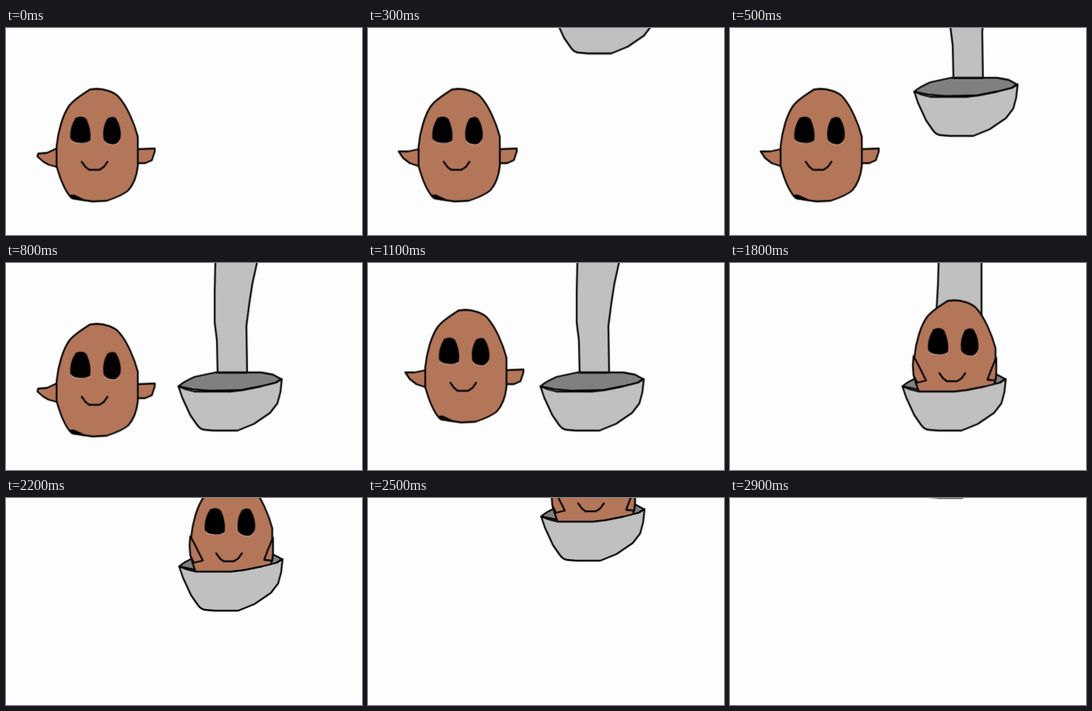
An HTML page that plays this animation: 482 by 281 pixels, repeating every 3000 ms.

```html
<!DOCTYPE html>
<html lang="en">
<head>
<meta charset="utf-8">
<title>Potato and ladle</title>
<style>
html, body { margin: 0; width: 100%; height: 100%; overflow: hidden; background: #fdfdfd; }
svg { display: block; width: 482px; height: 281px; }
.ink { stroke: #000; stroke-width: 2.3; stroke-linejoin: round; stroke-linecap: round; }
.skin { fill: #b47659; }
.steel { fill: #c0c0c0; }
.inside { fill: #808080; }
.line { fill: none; }
.glint { fill: none; stroke: #e4dcd8; stroke-width: .5; }

/* The slight negative delay keeps steps clear of the 100 ms boundaries. */
.ladle, .potato, .wave, .tuck, .narrow, .wide { animation: 3s step-end -8ms infinite; }
.ladle { animation-name: ladle; }
.potato { animation-name: potato; }
.wave { animation-name: wave; }
.tuck { animation-name: tuck; }
.narrow { animation-name: narrow; }
.wide { animation-name: wide; }
.low, .high { animation: low .2s step-end -8ms infinite; }
.high { animation-name: high; }

@keyframes ladle {
  0% { transform: translate(16px, -249px); }
  6.6667% { transform: translate(16px, -249px); animation-timing-function: steps(3, end); }
  16.6667% { transform: translate(16px, -81px); }
  20% { transform: translate(8px, -25px); }
  23.3333% { transform: translate(2px, -4px); }
  26.6667%, 60% { transform: none; }
  63.3333% { transform: translate(1px, -5px); animation-timing-function: steps(5, end); }
  80% { transform: translate(1px, -121px); animation-timing-function: steps(5, end); }
  96.6667%, 100% { transform: translate(1px, -228px); }
}
@keyframes potato {
  0%, 33.3333% { transform: none; }
  36.6667% { transform: translate(9px, -19px); }
  40% { transform: translate(20px, -53px); }
  43.3333% { transform: translate(46px, -75px); }
  46.6667% { transform: translate(74px, -85px); }
  50% { transform: translate(102px, -86px); }
  53.3333% { transform: translate(129px, -79px); }
  56.6667% { transform: translate(156px, -60px); }
  60% { transform: translate(181px, -32px); }
  63.3333% { transform: translate(182px, -37px); animation-timing-function: steps(5, end); }
  80% { transform: translate(182px, -153px); animation-timing-function: steps(5, end); }
  96.6667%, 100% { transform: translate(182px, -260px); }
}
@keyframes wave { 0% { opacity: 1; } 43.3333%, 100% { opacity: 0; } }
@keyframes tuck { 0% { opacity: 0; } 43.3333%, 100% { opacity: 1; } }
@keyframes narrow { 0% { opacity: 1; } 60%, 100% { opacity: 0; } }
@keyframes wide { 0% { opacity: 0; } 60%, 100% { opacity: 1; } }
@keyframes low { 0% { opacity: 1; } 50%, 100% { opacity: 0; } }
@keyframes high { 0% { opacity: 0; } 50%, 100% { opacity: 1; } }
</style>
</head>
<body>
<svg viewBox="-.5 -.5 482 281">
  <g class="ladle ink">
    <path class="inside" d="M233 167Q239 161 255 154L283 148H345L361 151 372 157 365 162 345 167 320 172 275 173 252 171Z"/>
    <path class="steel narrow" d="M283 -4L282 40V80L285 104 286 148H326L325 85 329 54 333 28 340 -4"/>
    <path class="steel wide" d="M282 -4L281 30 279 65V148H340V-4"/>
  </g>

  <g class="potato ink">
    <g class="wave skin">
      <path class="low" d="M68 163L55 169 43 170 42 174 50 181 57 185 68 188"/>
      <path class="high" d="M68 164L54 167 41 167 47 176 56 183 68 187"/>
      <path d="M178 164L201 163 201 167 197 179 188 183 178 183"/>
    </g>
    <path class="skin" d="M122 82C132 82 146 86 152 93C163 105 173 128 178 147V187C177 196 174 210 165 220Q157 227 136 234L117 235 103 233 88 230C80 222 73 205 68 187V160C70 140 76 118 85 105C93 95 103 90 113 83Z"/>
    <path d="M87 227L92 227 105 233 90 231Z"/>
    <g stroke-width="1">
      <path d="M94 122Q102 118 108 123Q115 138 113 152Q107 157 99 155Q89 154 87 149Q86 134 94 122Z"/>
      <path d="M137 123Q143 119 148 122Q156 135 154 149Q150 158 144 157Q134 156 132 150Q130 134 137 123Z"/>
    </g>
    <path class="glint" d="M88 153Q92 156 99 156T113 154M133 154Q137 158 144 158T153 154"/>
    <path class="line" d="M102 181L107 188 112 192H126L132 188 137 181"/>
    <g class="tuck skin">
      <path d="M67 158L72 167 84 191 72 194 67 184 66 170Z"/>
      <path d="M179 160L173 174 167 190 178 191 179 180Z"/>
    </g>
  </g>

  <g class="ladle ink">
    <path class="steel" d="M233 167L238 182 249 206 258 219Q263 226 269 226L281 227H313L335 218 357 203 367 190 371 175 373 157 365 162 345 167 320 172 303 174 255 174 243 171Z"/>
  </g>
</svg>
</body>
</html>
```
